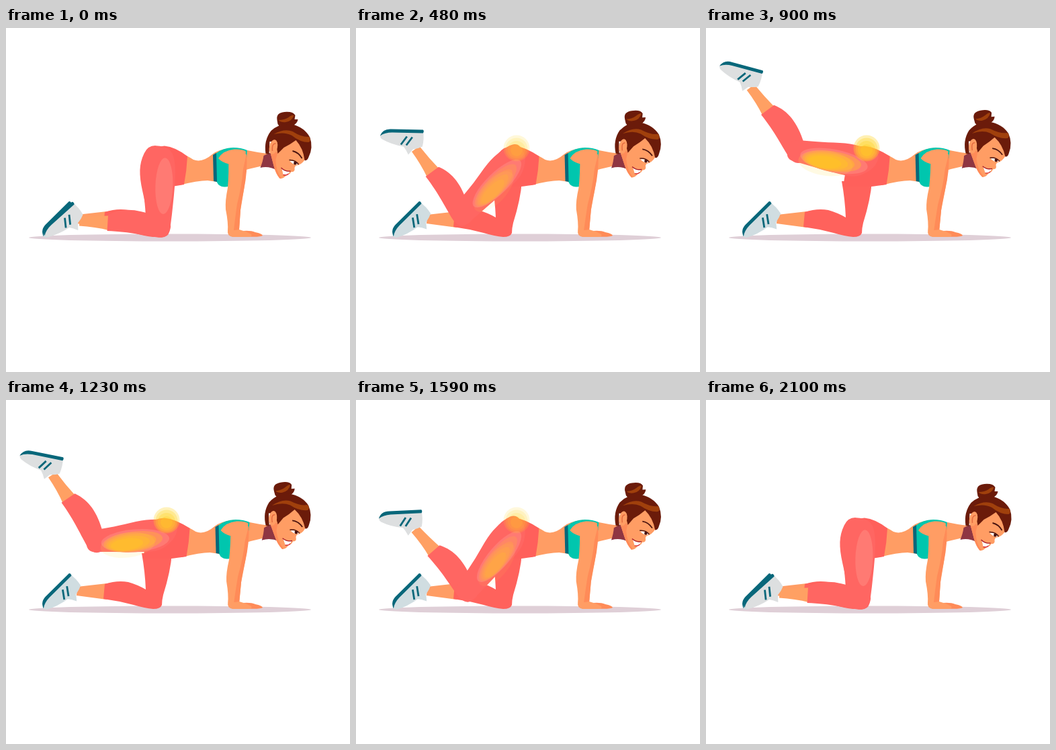
Write an HTML page with a canvas that moves like this. It is 512 by 512 pixels and loops after 2220 ms.

```html
<!DOCTYPE html>
<html lang="en">
<head>
<meta charset="utf-8">
<title>Donkey kick</title>
<style>
html, body { margin: 0; width: 100%; height: 100%; overflow: hidden; background: #fff; }
canvas { display: block; width: 100vw; height: 100vh; }
</style>
</head>
<body>
<canvas id="stage" width="512" height="512"></canvas>
<script>
const ctx = document.getElementById('stage').getContext('2d');
const LOOP = 2220, STEP = 30;
const RAD = Math.PI / 180;
const HIP = { x: 235, y: 197 };
const SHIN = 117;

const C = {
  skin: '#ff9d64', shade: '#ff8b58', ankle: '#ffa063',
  leg: '#ff6662', farLeg: '#ff625c', pelvis: '#ff605b', sheen: '#ff7a73',
  teal: '#00c6ae', dark: '#08677a', shoe: '#dddfe0', farShoe: '#d0dde1',
  hair: '#6b1b0a', hairLight: '#a0400c', neck: '#8f3642', line: '#4a1410'
};

const LIFT = [[0, 0], [480, .5], [750, .83], [900, 1], [1050, 1],
  [1230, .87], [1590, .45], [1830, .2], [2100, 0], [LOOP, 0]];
const THIGH = [[0, 4], [.2, 14], [.5, 44], [.83, 78], [1, 98]];
const CALF = [[0, 3.5], [.2, 24], [.5, 54], [.83, 56.5], [1, 53]];
const FOOT = [[0, -43], [.2, -23], [.5, 0], [.83, 9], [1, 14]];

const mix = (a, b, k) => a + (b - a) * k;

function sample(keys, x) {
  let i = 1;
  while (i < keys.length - 1 && x > keys[i][0]) i++;
  const [x0, y0] = keys[i - 1], [x1, y1] = keys[i];
  return mix(y0, y1, (x - x0) / (x1 - x0));
}

function fill(d, color) {
  ctx.fillStyle = color;
  ctx.fill(new Path2D(d));
}

function stroke(d, color, width) {
  ctx.strokeStyle = color;
  ctx.lineWidth = width;
  ctx.stroke(new Path2D(d));
}

function oval(x, y, rx, ry, color, turn = 0) {
  ctx.fillStyle = color;
  ctx.beginPath();
  ctx.ellipse(x, y, rx, ry, turn * RAD, 0, 7);
  ctx.fill();
}

function at(x, y, deg, draw) {
  ctx.save();
  ctx.translate(x, y);
  ctx.rotate(deg * RAD);
  draw();
  ctx.restore();
}

// Closed smooth outline through the midpoints of the given points
function blob(pts, color) {
  const mid = (a, b) => [(a[0] + b[0]) / 2, (a[1] + b[1]) / 2];
  const n = pts.length;
  ctx.fillStyle = color;
  ctx.beginPath();
  ctx.moveTo(...mid(pts[n - 1], pts[0]));
  pts.forEach((p, i) => ctx.quadraticCurveTo(...p, ...mid(p, pts[(i + 1) % n])));
  ctx.fill();
}

function shoe(color) {
  fill('M-54,-22 Q-48,-31 -37,-30 L10,-29 Q12,-17 9,-5 Q3,-2 -5,-1 L-12,7 Q-15,0 -19,-5 Q-37,-8 -51,-16 Q-54,-18 -54,-22Z', color);
  fill('M-54,-21 Q-50,-32 -37,-31 L10,-30 Q12,-28 10,-25 L-36,-26 Q-47,-26 -54,-21Z', C.dark);
  stroke('M-14,-20 L-23,-8 M-6,-19 L-15,-7', C.dark, 2.8);
}

function farLeg() {
  fill('M150,273 L106,278 L105,291 L150,297Z', C.skin);
  at(108.5, 286, -46, () => shoe(C.farShoe));
  fill('M147,274 Q165,268 182,271 Q196,275 208,282 Q207,256 202,228 L247,228 Q245,255 234,290 Q232,298 232,305 Q230,311 219,311 Q207,310 190,305 Q168,299 145,296Z', C.farLeg);
}

function nearLeg(q, s) {
  const thigh = sample(THIGH, q), calf = sample(CALF, q);
  const len = 98 + 12 * Math.sin(q * Math.PI) ** 2;
  const knee = { x: HIP.x - len * Math.sin(thigh * RAD), y: HIP.y + len * Math.cos(thigh * RAD) };
  const ankle = { x: knee.x - SHIN * Math.cos(calf * RAD), y: knee.y - SHIN * Math.sin(calf * RAD) };

  at(knee.x, knee.y, 180 + calf, () =>
    fill('M74,-11 Q95,-7 119,-7 L119,7 Q95,8 74,11Z', C.ankle));
  at(ankle.x, ankle.y, sample(FOOT, q), () => shoe(C.shoe));
  at(knee.x, knee.y, 180 + calf, () =>
    fill('M0,-17 C20,-16 42,-11 77,-12 L77,12 C57,24 35,24 6,14 L-8,14 Q-17,9 -17,0 Q-16,-17 0,-17Z', C.leg));

  at(HIP.x, HIP.y, 90 + thigh, () => {
    blob([
      [-21, mix(1, 2, s)], [-21, mix(25, 14, s)], [4, mix(35, 20, s)],
      [30, mix(34, 22, s)], [66, mix(23, 18, s)], [len - 6, 17],
      [len + 15, 15], [len + 18, -14], [len - 4, -17],
      [66, -mix(18, 21, s)], [36, -mix(19, 25, s)], [8, -mix(18, 27, s)], [-14, -12]
    ], C.leg);
    const cx = mix(38, 44, s), cy = mix(-3, -7, s);
    const rx = mix(42, 51, s), ry = mix(13, 17, s);
    oval(cx, cy, rx, ry, C.sheen, mix(-2, 3, s));
    oval(cx + 12, cy - 5, rx * .8, ry * 1.1, `rgba(255,225,80,${.16 * q})`);
    for (let i = 1; i < 5; i++)
      oval(cx + i * 3.2, cy - i * .9, rx * (1 - .13 * i), ry * (1 - .12 * i), `rgba(255,205,25,${.31 * q})`);
  });
}

function torso(dx) {
  ctx.save();
  ctx.translate(dx, 0);
  fill('M252,182 Q268,189 279,196 Q292,201 307,188 Q315,181 335,178.5 L359,182 Q373,185 389,187 L394,203 Q386,206 378,206 Q363,209 348,214 L330,231 Q314,229 300,227 Q285,227 258,234Z', C.skin);
  fill('M312,187 Q322,178.5 338,178 Q350,178 359,182 L358,194 L345,203 L333,235 Q323,239 316,233 L313,228Z', C.teal);
  fill('M308,189 L313,186 L314,229 L309,228Z', C.dark);
  fill('M316,194 Q323,182 340,180.5 Q353,180 357,184 L354,199 L333,203 Q321,200 316,194Z', C.skin);
  ctx.restore();
}

function arm(dx) {
  const k = dx / 130;
  ctx.save();
  ctx.transform(1, 0, -k, 1, k * 310, 0);
  fill('M345,303 Q362,300 371,304 Q381,306 382,309 Q378,312 350,310Z', C.shade);
  fill('M331,190 Q334,181 344,181 Q357,182 358,191 Q358,215 354,241 Q351,260 349,271 L347,300 Q356,302 365,307 Q368,311 358,311 L337,311 Q329,309 330,302 Q331,290 327,270 Q326,257 330,238 Q332,215 331,190Z', C.skin);
  fill('M358,187 Q360,212 354,241 Q350,260 349,271 L347,300 L339,301 Q342,275 344,262 Q351,235 353,210Z', C.shade);
  ctx.restore();
}

function head(dx, turn) {
  at(386.5 + dx, 196, turn, () => {
    ctx.translate(-385, -196);
    fill('M382,190 L395,184 L402,212 Q390,205 377,208 Q381,198 382,190Z', C.neck);
    // bun
    fill('M402,137 Q400,126 413,125 Q426,124 429,130 L428,136 L433,136 Q432,142 426,145 L424,152 L404,152 Q407,147 403,143Z', C.hair);
    fill('M404,137 Q413,137 419,133 Q424,129 427,130 Q424,139 415,140 Q408,141 404,137Z', C.hairLight);
    // face
    fill('M391,182 L397,205 Q400,217 406,224 Q411,225 416,219 L421,217 L423,214 Q429,215 428,208 Q429,204 434,204 Q441,201 445,193 L437,164 L398,164Z', C.skin);
    fill('M391,182 L397,205 Q400,217 406,224 L408,223 Q400,212 400,196 L403,185Z', C.shade);
    // hair
    fill('M385,187 Q382,167 393,153 Q406,141 424,143 Q443,148 451,163 Q456,178 449,192 Q447,198 443,197 Q441,179 430,167 Q422,173 412,178 L403,187 L400,170 L391,169 L390,188Z', C.hair);
    fill('M397,158 Q413,149 425,154 Q439,163 450,162 Q453,168 449,170 Q436,170 424,160 Q413,154 397,158Z', C.hairLight);
    oval(396.5, 177, 6, 11, C.skin, 12);
    stroke('M395,183 Q394,171 400,172', '#e56c40', 1.5);
    // features
    stroke('M425,183 Q434,185 439,194', C.line, 1.8);
    fill('M421,198 Q429,197 433,203 Q427,205 421,198Z', '#fff');
    oval(429, 201, 2.3, 2.6, C.line);
    stroke('M420,196.5 Q429,196 434,203', C.line, 1.5);
    fill('M409,209 Q415,215 421,213 Q419,220 411,218Z', '#fff');
    stroke('M408,208 Q414,214 422,213', '#a81f2b', 1.4);
    stroke('M411,218.5 Q416,220 419,217', '#d8343a', 1.4);
  });
}

function draw(time) {
  const q = sample(LIFT, time);
  const s = Math.sin(q * Math.PI / 2);
  const dx = 3.6 * s;

  ctx.fillStyle = '#fff';
  ctx.fillRect(0, 0, 512, 512);
  oval(244, 312, 210, 5.5, '#dfcfd7');
  farLeg();
  torso(dx);
  const w = 270 + dx;
  fill(`M212,187 Q219,176 236,175.5 Q252,177 ${w},191 Q${w - 1},212 ${w - 5},233 Q254,235 246,236 L204,236Z`, C.pelvis);
  nearLeg(q, s);
  [19.5, 16.5, 13, 9].forEach((r, i) =>
    oval(239, 179 + i, r, r, `rgba(255,210,35,${.34 * q})`));
  head(dx * .3, -5.5 * s);
  arm(dx);
}

function tick(now) {
  draw(Math.floor(now % LOOP / STEP) * STEP);
  requestAnimationFrame(tick);
}
draw(0);
requestAnimationFrame(tick);
</script>
</body>
</html>
```
